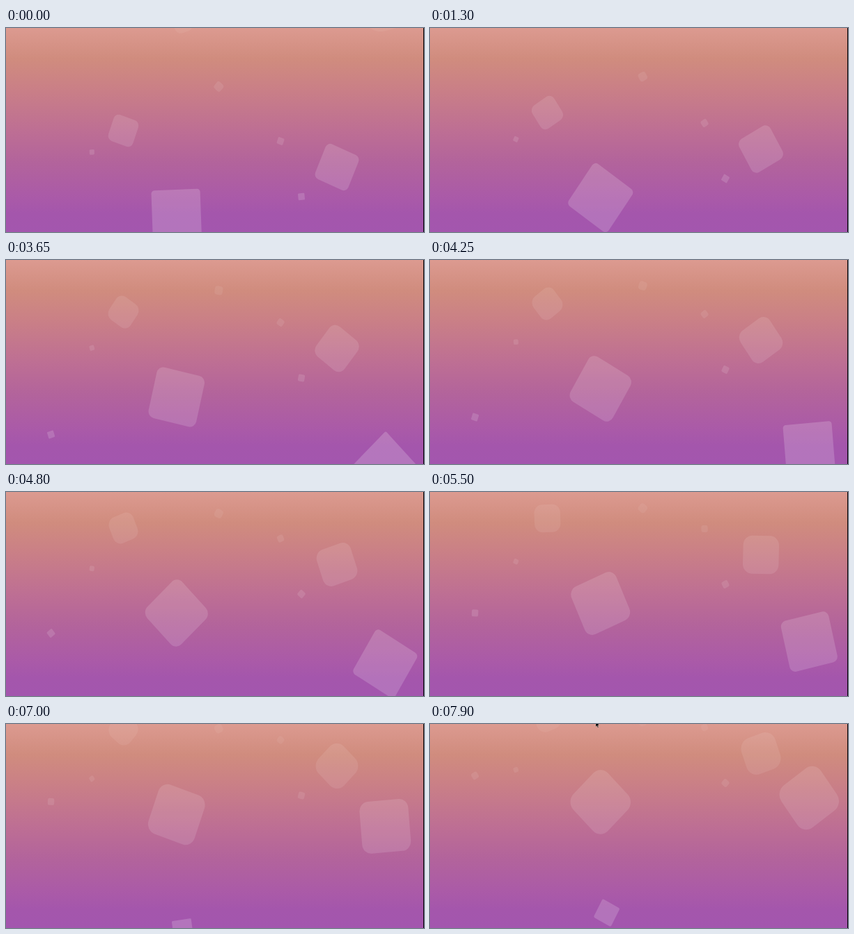
Recreate the animation shown at these times as an HTML page. Size 600x294 px, loop 7.95 s.

```html
<!DOCTYPE html>
<html lang="en">
<head>
<meta charset="utf-8">
<title>Floating squares</title>
<style>
  html, body { margin: 0; width: 100%; height: 100%; overflow: hidden; }
  svg { display: block; width: 600px; height: 294px; }
</style>
</head>
<body>
<svg viewBox="0 0 600 294" xmlns="http://www.w3.org/2000/svg">
  <defs>
    <linearGradient id="sky" x1="0" y1="0" x2="0" y2="1">
      <stop offset="0" stop-color="#dc9a90"/>
      <stop offset=".15" stop-color="#d08c7e"/>
      <stop offset=".29" stop-color="#ca8086"/>
      <stop offset=".51" stop-color="#bd6e94"/>
      <stop offset=".65" stop-color="#b3649b"/>
      <stop offset=".83" stop-color="#aa5aa8"/>
      <stop offset=".91" stop-color="#a456ac"/>
      <stop offset="1" stop-color="#a356ae"/>
    </linearGradient>
  </defs>
  <rect width="600" height="294" fill="url(#sky)"/>
  <!-- page units: 1280 x 588 -->
  <g id="squares" transform="scale(.468 .5)" fill="#fff"></g>
  <rect x="599" width="1" height="294"/>
  <path id="pointer" d="M238-3.5v7.4l1.6-1.5 1.2 2.9 1.1-.5-1.2-2.8h2.2z"
        stroke="#fff" stroke-opacity=".6" stroke-width=".4"/>
</svg>
<script>
const LOOP = 7950, STEP = 50, START = 85.05;
const PAGE_WIDTH = 1280, PAGE_HEIGHT = 588, RISE = 1000, DROP = 150;
const POINTER_FROM = 7150;

// left (fraction of page), size, delay (s), duration (s)
const squares = [
  [.25, 80, 0, 25],
  [.10, 20, 2, 12],
  [.70, 20, 4, 25],
  [.40, 60, 0, 18],
  [.65, 20, 0, 25],
  [.75, 110, 3, 25],
  [.35, 150, 7, 25],
  [.50, 25, 15, 45],
  [.20, 15, 2, 35],
  [.85, 150, 0, 11],
].map(([left, size, delay, duration]) => {
  const node = document.createElementNS("http://www.w3.org/2000/svg", "rect");
  const attributes = { x: -size / 2, y: -size / 2, width: size, height: size };
  for (const name in attributes) node.setAttribute(name, attributes[name]);
  document.getElementById("squares").append(node);
  return { node, size, delay, duration, x: left * PAGE_WIDTH + size / 2 };
});
const pointer = document.getElementById("pointer");

function draw(ms) {
  const seconds = START + ms / 1000;
  for (const { node, size, delay, duration, x } of squares) {
    const progress = (seconds - delay) % duration / duration;
    const y = PAGE_HEIGHT + DROP - size / 2 - RISE * progress;
    node.setAttribute("transform", `translate(${x} ${y}) rotate(${720 * progress})`);
    node.setAttribute("rx", size / 2 * progress);
    node.setAttribute("fill-opacity", .2 * (1 - progress));
  }
  pointer.setAttribute("visibility", ms >= POINTER_FROM ? "visible" : "hidden");
}

const begin = performance.now();
function tick() {
  const elapsed = (performance.now() - begin) % LOOP;
  draw(Math.floor(elapsed / STEP) * STEP);
  requestAnimationFrame(tick);
}
tick();
</script>
</body>
</html>
```
